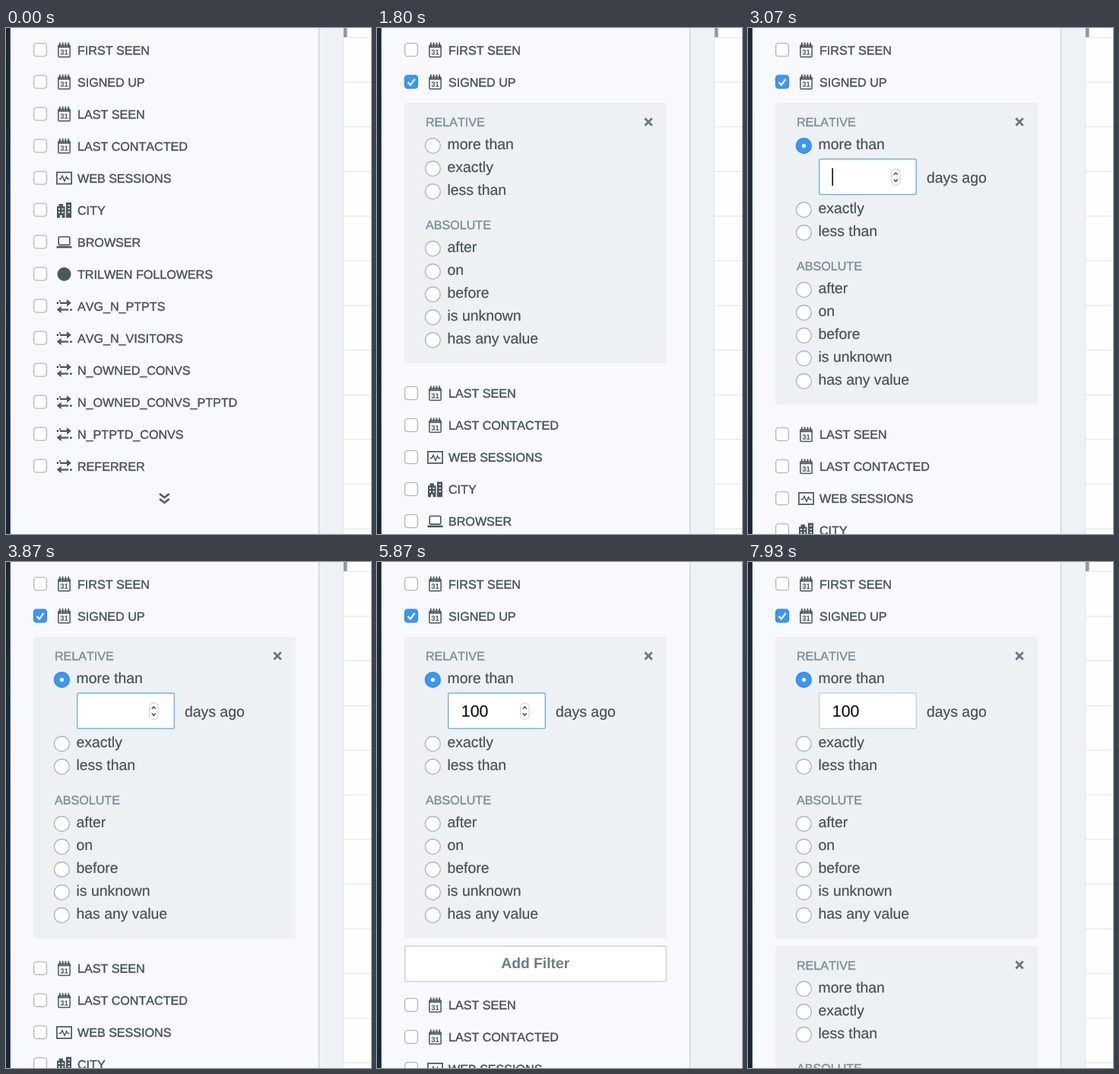
Write an HTML page that moves like this. It is 480x664 px and loops after 8000 ms.

```html
<!DOCTYPE html>
<html lang="en">
<head>
<meta charset="utf-8">
<title>Filter panel</title>
<style>
html, body { margin: 0; width: 100%; height: 100%; overflow: hidden; background: #eef2f6; }
svg { display: block; width: 480px; height: 664px; }
text {
  font-family: "Liberation Sans", Arial, sans-serif; white-space: pre;
  font-kerning: none; text-rendering: geometricPrecision;
}
.label { font-size: 16.1px; fill: #475259; stroke: #475259; stroke-width: .4; }
.head { font-size: 16.1px; fill: #7a8e98; stroke: #7a8e98; stroke-width: .4; }
.opt { font-size: 19.4px; fill: #465157; stroke: #465157; stroke-width: .2; }
.num { font-size: 21.3px; fill: #111; stroke: #111; stroke-width: .2; }
.btn { font-size: 19.3px; font-weight: bold; text-anchor: middle; }
.box { fill: #fff; stroke: #b3b8bc; stroke-width: 1.4; }
.box.down { fill: #ebecee; stroke: #9b9fa3; }
.box.on { fill: #3b97f6; stroke: #3389ea; }
.ico { fill: #4a575f; }
.line { fill: none; stroke: #4a575f; }
</style>
</head>
<body>
<svg id="stage" viewBox="0 0 480 664" width="480" height="664">
  <defs>
    <linearGradient id="navy" x1="0" y1="0" x2="0" y2="1">
      <stop offset="0" stop-color="#1c2735"/>
      <stop offset=".35" stop-color="#182c40"/>
      <stop offset="1" stop-color="#14273a"/>
    </linearGradient>
  </defs>
</svg>
<script>
const LOOP = 8000;
const ROW = 42;
const stage = document.getElementById('stage');
const $ = id => document.getElementById(id);

// Icons are drawn around (0, 0).
const icons = {
  calendar: `<rect class="line" x="-7.6" y="-6.6" width="15.2" height="15.6" rx="1" stroke-width="1.5"/>
    <path class="line" d="M-8-4.2H8" stroke-width="2"/>
    <path class="line" d="M-5.7-10v5M-1.9-10v5M1.9-10v5M5.7-10v5" stroke-width="1.7"/>
    <text class="ico" x="0" y="6.4" font-size="9.5" font-weight="bold" text-anchor="middle">31</text>`,
  pulse: `<rect class="line" x="-9.6" y="-7.6" width="19.2" height="15.2" stroke-width="1.7"/>
    <path class="line" d="M-7 1H-4.5L-2.5-3 .5 4 3-2 4.5 1H7" stroke-width="1.4"/>`,
  city: `<path class="ico" fill-rule="evenodd" d="M-9.5-5H-7V-8H-1.5V-5H1V10H-3V6.5H-5.5V10H-9.5Z
      M-7.5-2.5v2h2v-2Z M-3-2.5v2h2v-2Z M-7.5 2v2h2v-2Z M-3 2v2h2v-2Z
      M2.4-10H9.5V10H2.4Z M5-7v1.6H7.5V-7Z M5-2.6v1.6H7.5v-1.6Z M5 1.8v1.6H7.5v-1.6Z"/>`,
  laptop: `<rect class="line" x="-7.3" y="-7" width="14.6" height="10.6" rx="1" stroke-width="1.6"/>
    <path class="line" d="M-10 6.5H10" stroke-width="2.6"/>`,
  dot: `<circle class="ico" r="9"/>`,
  swap: `<path class="line" d="M-5.5-4.2H5M-4.5 4.6H5.5" stroke-width="2.3"/>
    <path class="ico" d="M3.5-8.8L9.3-4.2 3.5.4ZM-4 0L-9.8 4.6-4 9.2Z
      M-9.8-5.4h2.6v2.5h-2.6ZM-6.6-7.8h2v2h-2ZM7.5 3.4h2.7v2.5H7.5Z"/>`
};

const rows = [
  ['FIRST SEEN', 'calendar'], ['SIGNED UP', 'calendar'], ['LAST SEEN', 'calendar'],
  ['LAST CONTACTED', 'calendar'], ['WEB SESSIONS', 'pulse'], ['CITY', 'city'],
  ['BROWSER', 'laptop'], ['TRILWEN FOLLOWERS', 'dot'], ['AVG_N_PTPTS', 'swap'],
  ['AVG_N_VISITORS', 'swap'], ['N_OWNED_CONVS', 'swap'],
  ['N_OWNED_CONVS_PTPTD', 'swap'], ['N_PTPTD_CONVS', 'swap'], ['REFERRER', 'swap']
];

const text = (cls, x, y, s) => `<text class="${cls}" x="${x}" y="${y}">${s}</text>`;

function row([name, icon], i) {
  const y = 29 + ROW * i;
  return `<rect class="box" id="check${i}" x="36.6" y="${y - 8.9}" width="16.8" height="17" rx="3.6"/>
    <g transform="translate(76.5 ${y})">${icons[icon]}</g>` + text('label', 94, y + 5.7, name);
}

const option = (name, y, id = '') =>
  `<circle class="box" ${id && `id="${id}"`} cx="73.4" cy="${y + 1.6}" r="9.9"/>` +
  text('opt', 92.5, y + 6.4, name);

function panel(id) {
  const late = ['after', 'on', 'before', 'is unknown', 'has any value'];
  return `<rect id="${id}Back" x="36" y="98" width="345" height="342" rx="3" fill="#edf1f4"/>` +
    text('head', 64, 129, 'RELATIVE') +
    `<path d="M352.3 118.5l9.4 9.4m0-9.4l-9.4 9.4" stroke="#667883" stroke-width="2.8"/>` +
    option('more than', 153, id + 'More') +
    `<g id="${id}Rest">` + option('exactly', 183) + option('less than', 213) +
    text('head', 64, 264.2, 'ABSOLUTE') +
    late.map((s, i) => option(s, 288 + 30 * i)).join('') + '</g>';
}

const input = `<rect id="field" x="93.7" y="172" width="127.6" height="46.4" rx="2" fill="#fff" stroke-width="1.5"/>
  <g id="spin" fill="none"><rect x="188.5" y="185" width="11.6" height="21.4" rx="5.5" fill="#fdfdfd" stroke="#c9cccf"/>
  <path d="M191.8 192.8l2.5-3 2.5 3M191.8 198.6l2.5 3 2.5-3" stroke="#555" stroke-width="1.5"/></g>
  <text class="num" id="value" x="110.8" y="203.2"></text>
  <rect id="caret" y="184" width="1.6" height="23" fill="#111"/>` + text('opt', 235, 203, 'days ago');

const button = `<rect id="shade" x="36.5" y="505.2" width="344" height="47" rx="2" fill="#b9c2c7"/>
  <rect id="face" x="36.7" y="504" width="343.6" height="46.4" rx="1.5" fill="#fff" stroke-width="1.5"/>
  <text id="add" class="btn" x="208.2" y="533.2">Add Filter</text>`;

const lines = Array.from({length: 12}, (_, i) => `M444 ${(12.5 + 58.6 * i).toFixed(1)}h36`).join('');

stage.insertAdjacentHTML('beforeend', `
  <rect width="480" height="664" fill="#eef2f6"/>
  <g id="table"><rect x="443.5" width="37" height="664" fill="#fefeff"/>
    <path d="${lines}M443.5 0V664" stroke="#e3e8ed" stroke-width="1.2"/>
    <rect x="444" width="4.6" height="12" fill="#8f9ba3"/></g>
  <rect x="5" width="406.5" height="664" fill="#f8f9fd"/>
  <rect x="411" width="1.3" height="664" fill="#c6d4dc"/>
  <rect width="5.8" height="664" fill="url(#navy)"/>
  ${rows.slice(0, 2).map(row).join('')}
  <path id="tick" d="M40.6 71.2l3.3 3.6 5.8-8" fill="none" stroke="#fff" stroke-width="2.2"/>
  <g id="below">${rows.slice(2).map((r, i) => row(r, i + 2)).join('')}
    <path class="line" d="M202 611.2l6.3 5 6.3-5M202 618l6.3 5 6.3-5" stroke-width="2.5"/></g>
  <g id="first">${panel('a')}<circle id="pip" cx="73.4" cy="154.6" r="2.6" fill="#fff"/>
    <g id="input">${input}</g></g>
  <g id="button">${button}</g>
  <g id="second" transform="translate(0 405.6)">${panel('b')}</g>`);

const show = (id, on) => $(id).setAttribute('display', on ? 'inline' : 'none');
const set = (id, name, v) => $(id).setAttribute(name, v);
const ramp = (t, a, b) => Math.min(1, Math.max(0, (t - a) / (b - a)));
const within = (t, a, b) => t >= a && t < b;

function mix(a, b, k) {
  return `rgb(${a.map((v, i) => Math.round(v + (b[i] - v) * k)).join(',')})`;
}

function draw(t) {
  const open = t >= 1795;
  const chosen = t >= 3065;
  const typed = t < 4865 ? 0 : t < 5065 ? 1 : t < 5265 ? 2 : 3;
  const blurred = t >= 7865;
  const added = t >= 7925;

  set('check1', 'class', open ? 'box on' : t >= 1665 ? 'box down' : 'box');
  show('tick', open);
  show('first', open);
  set('below', 'transform', `translate(0 ${added ? 900 : typed ? 468.5 : chosen ? 420.5 : open ? 366.5 : 0})`);

  set('aMore', 'class', chosen ? 'box on' : t >= 2925 ? 'box down' : 'box');
  set('aBack', 'height', chosen ? 396 : 342);
  set('aRest', 'transform', `translate(0 ${chosen ? 54 : 0})`);
  show('pip', chosen);
  show('input', chosen);

  set('field', 'stroke', blurred ? '#c6d5de' : '#72b6e4');
  show('spin', !blurred);
  $('value').textContent = '100'.slice(0, typed);
  set('caret', 'x', 110.4 + typed * 11.85);
  show('caret', within(t, 3065, 3725) || within(t, 4265, 4725) ||
    within(t, 4865, 5600) || within(t, 6265, 7865));

  const hover = ramp(t, 6270, 6530);
  show('button', typed && !added);
  set('shade', 'opacity', .6 * hover);
  set('face', 'stroke', mix([199, 211, 216], [164, 177, 183], hover));
  set('add', 'fill', mix([108, 125, 134], [76, 92, 101], hover));
  show('second', added);

  set('table', 'opacity', t < 6000 ? 1 - ramp(t, 5200, 5330) : ramp(t, 7270, 7470));
}

function frame() {
  draw(performance.now() % LOOP);
  requestAnimationFrame(frame);
}
frame();
</script>
</body>
</html>
```
